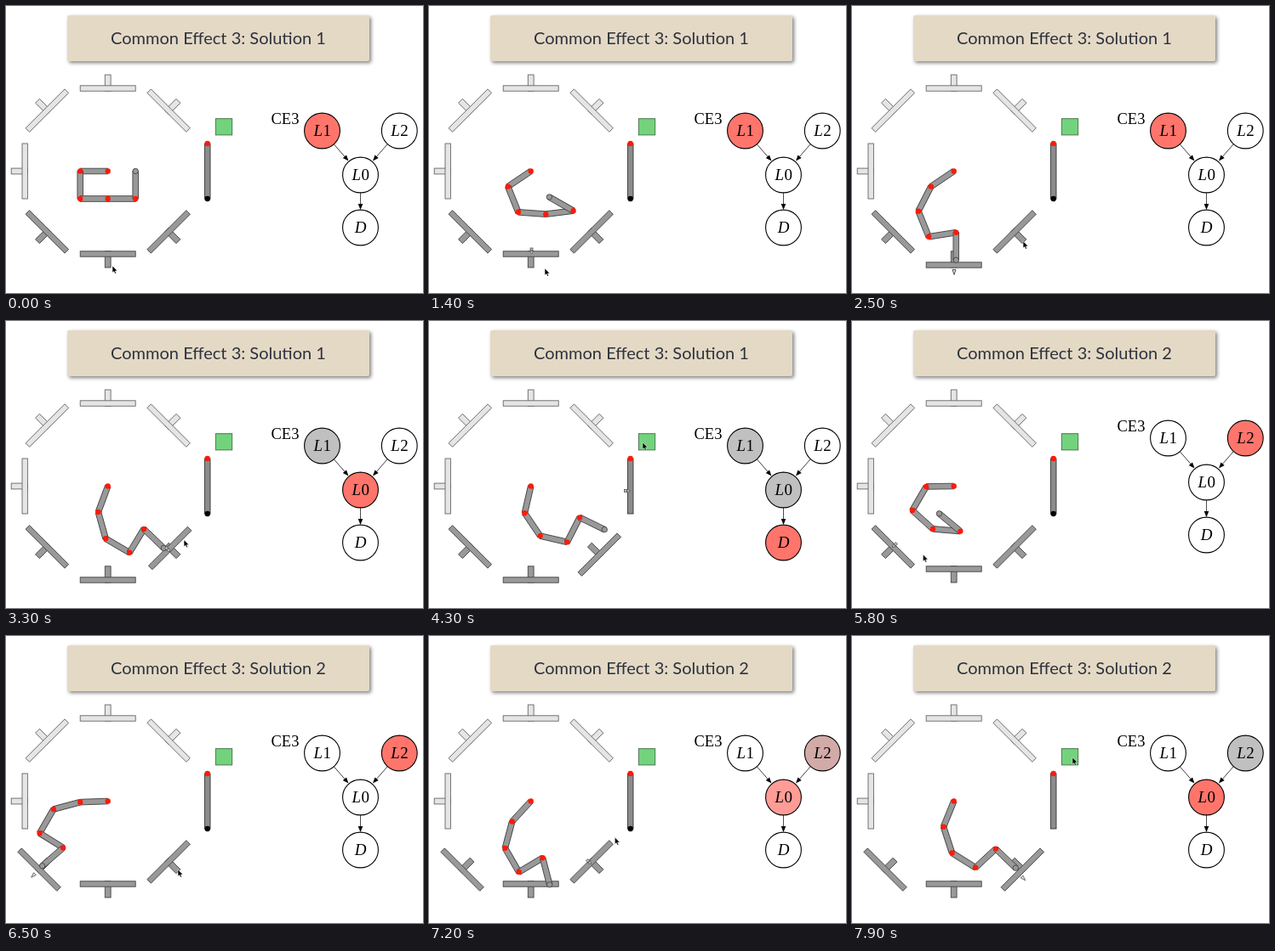
These frames come from a looping animation (490 px wide and 338 px high, 8000 ms). An HTML page with a canvas:

```html
<!DOCTYPE html>
<html lang="en">
<head>
<meta charset="utf-8">
<style>
html, body { margin: 0; width: 100%; height: 100%; overflow: hidden; background: #fff; }
canvas { display: block; }
</style>
</head>
<body>
<canvas width="490" height="338"></canvas>
<script>
const ctx = document.querySelector('canvas').getContext('2d');
const LOOP = 8000, RESET = 5000, LINK = 32.5, RED = '#ff1a0a', DEG = Math.PI / 180;

// Absolute link angles in degrees, from the base outwards
const pose = {
  rest: [180, 90, 0, 0, -90],
  swing: [146, 68, 4, -7, -150],
  touch1: [150, 112, 55, -30, -265],
  push1: [146, 117, 68, -9, -270],
  touch2: [178, 165, 105, 12, -215],
  push2: [178, 165, 120, 32, -221],
  touch0: [110, 75, 30, -62, -316],
  push0: [112, 72, 32, -43, -316],
  reach: [103, 56, 13, -63, -334],
  touchDoor: [64, 30, -6, -76, -368],
  pushDoor: [50, 25, -5, -60, -368]
};
const armKeys = [
  [0, 'rest'], [800, 'rest'], [1400, 'swing'], [2000, 'touch1'], [2400, 'push1'], [2650, 'push1'],
  [3250, 'touch0'], [3550, 'push0'], [3750, 'push0'], [4300, 'reach'], [4700, 'touchDoor'],
  [4999, 'pushDoor'], [RESET, 'rest'], [5500, 'rest'], [6250, 'touch2'], [6500, 'push2'],
  [6700, 'push2'], [7450, 'touch0'], [7800, 'push0'], [LOOP, 'push0']
].map(([t, name]) => [t, ...pose[name]]);
const cursorKeys = [
  [0, 125, 306], [900, 132, 320], [1400, 136, 309], [1800, 150, 306], [2450, 201, 277],
  [3200, 202, 277], [3900, 251, 143], [4999, 251, 143], [RESET, 39, 275], [5600, 40, 275],
  [6350, 202, 275], [7000, 202, 275], [7700, 259, 143], [LOOP, 259, 143]
];

const ramp = (t, a, b) => Math.min(1, Math.max(0, (t - a) / (b - a)));
const mix = (a, b, k) => a + (b - a) * k;

function sample(keys, t) {
  const i = keys.findIndex(k => k[0] > t), a = keys[i - 1], b = keys[i];
  return a.slice(1).map((v, j) => mix(v, b[j + 1], ramp(t, a[0], b[0])));
}

function box(x, y, w, h, fill, stroke) {
  ctx.fillStyle = fill;
  ctx.fillRect(x, y, w, h);
  ctx.strokeStyle = stroke;
  ctx.strokeRect(x, y, w, h);
}

function disc(x, y, r, fill, stroke) {
  ctx.beginPath();
  ctx.arc(x, y, r, 0, 7);
  ctx.fillStyle = fill;
  ctx.fill();
  if (stroke) {
    ctx.strokeStyle = stroke;
    ctx.stroke();
  }
}

function shape(points, fill, stroke) {
  ctx.beginPath();
  points.forEach(p => ctx.lineTo(...p));
  ctx.closePath();
  ctx.fillStyle = fill;
  ctx.fill();
  if (stroke) {
    ctx.strokeStyle = stroke;
    ctx.stroke();
  }
}

function at(x, y, deg, draw) {
  ctx.save();
  ctx.translate(x, y);
  ctx.rotate(deg * DEG);
  draw();
  ctx.restore();
}

function text(str, x, y, font, color = '#000') {
  ctx.font = font;
  ctx.fillStyle = color;
  ctx.fillText(str, x, y);
}

function title(n) {
  ctx.save();
  ctx.shadowColor = 'rgba(0,0,0,.5)';
  ctx.shadowBlur = 4;
  ctx.shadowOffsetX = ctx.shadowOffsetY = 2;
  ctx.fillStyle = '#e4d9c5';
  ctx.beginPath();
  ctx.roundRect(72, 11, 355, 54, 2);
  ctx.fill();
  ctx.restore();
  ctx.textAlign = 'center';
  text('Common Effect 3: Solution ' + n, 249.5, 45, '20px Lato, sans-serif', '#2d333d');
}

// Bar slides outwards along a fixed track
function lever(deg, push, active) {
  const r = deg % 90 ? 101 : 97.5, fill = active ? '#999' : '#e5e5e5', edge = active ? '#444' : '#666';
  at(119.7, 194.5, deg, () => {
    box(-3.4, r - 3.2, 6.8, 19.2, fill, edge);
    box(-32.5, r - 3.2 + 13 * push, 65, 6.4, fill, edge);
  });
}

function door(swing, locked) {
  at(236.7, 162, -22 * swing, () => {
    box(-3.3, 0, 6.6, 65, '#8c8c8c', '#333');
    if (locked) disc(0, 65, 3.2, '#000');
    disc(0, 0, 3.2, RED);
  });
}

function arm(angles) {
  const joints = [[119.7, 194.5]];
  angles.forEach((a, i) => {
    const [x, y] = joints[i];
    at(x, y, a, () => box(0, -3.3, LINK, 6.6, '#999', '#444'));
    joints.push([x + LINK * Math.cos(a * DEG), y + LINK * Math.sin(a * DEG)]);
  });
  joints.forEach(([x, y], i) => i < 5 ? disc(x, y, 3.2, RED) : disc(x, y, 3.2, '#999', '#444'));
}

// Small arrow showing where the arm is heading
function marker(deg, from, to, push) {
  at(mix(from[0], to[0], push), mix(from[1], to[1], push), deg, () => {
    if (push < .3) box(-1.5, -2, 3, 3, '#bbb', '#444');
    shape([[-2, 1.5], [2, 1.5], [0, 5 + 2.5 * push]], '#ddd', '#444');
  });
}

function arrow(x1, y1, x2, y2) {
  const len = Math.hypot(x2 - x1, y2 - y1);
  at(x1, y1, Math.atan2(y2 - y1, x2 - x1) / DEG, () => {
    ctx.strokeStyle = '#000';
    ctx.beginPath();
    ctx.moveTo(0, 0);
    ctx.lineTo(len - 5, 0);
    ctx.stroke();
    shape([[len, 0], [len - 7, -2.8], [len - 7, 2.8]], '#000');
  });
}

// Heat runs 0 white, 1 red, 2 grey
function heatColor(h) {
  const stops = [[255, 255, 255], [255, 117, 107], [192, 192, 192], [192, 192, 192]], i = Math.floor(h);
  return `rgb(${stops[i].map((v, j) => mix(v, stops[i + 1][j], h - i))})`;
}

function node(letter, digit, x, y, heat) {
  ctx.lineWidth = 1.1;
  disc(x, y, 20.9, heatColor(heat), '#000');
  ctx.textAlign = digit ? 'left' : 'center';
  text(letter, digit ? x - 10 : x, y + 6, 'italic 19px "Liberation Serif", serif');
  if (digit) text(digit, x + 1, y + 6, '19px "Liberation Serif", serif');
}

function graph(dy, l1, l2, l0, d) {
  ctx.save();
  ctx.translate(0, dy);
  ctx.textAlign = 'left';
  text('CE3', 311.5, 139, '18.5px "Liberation Serif", serif');
  arrow(385.5, 163, 402.5, 182.5);
  arrow(448, 163, 431, 182.5);
  arrow(416.5, 220, 416.5, 240);
  node('L', '1', 371.5, 147, l1);
  node('L', '2', 462.3, 147, l2);
  node('L', '0', 416.5, 199, l0);
  node('D', '', 416.5, 261, d);
  ctx.restore();
}

function cursor([x, y]) {
  ctx.lineWidth = .5;
  shape([[0, 0], [0, 8], [1.8, 6.5], [3.2, 9.2], [4.5, 8.6], [3.3, 6], [5.8, 5.8]]
    .map(([a, b]) => [x + a, y + b]), '#000', '#fff');
}

function draw(t) {
  const second = t >= RESET;
  const push1 = second ? 0 : ramp(t, 2000, 2400);
  const push2 = ramp(t, 6250, 6500);
  const push0 = second ? ramp(t, 7450, 7800) : ramp(t, 3250, 3550);

  ctx.fillStyle = '#fff';
  ctx.fillRect(0, 0, 490, 338);
  title(second ? 2 : 1);

  ctx.lineWidth = .9;
  if (t > 1000 && t < 2650 && push1 > .3) marker(0, [120.5, 287], [120, 309], push1);
  for (const a of [90, 135, 180, 225]) lever(a, 0, false);
  lever(0, push1, true);
  lever(45, push2, true);
  lever(-45, push0, true);
  box(246.3, 132.7, 19.4, 19.2, '#73d37d', '#3f6b44');
  door(second ? 0 : ramp(t, 4700, 4990), push0 < 1);
  arm(sample(armKeys, t));

  ctx.lineWidth = .7;
  if (t > 1000 && push1 <= .3 && !second) marker(0, [120.5, 287], [120, 309], push1);
  if (t > 5700 && t < 6700) marker(45, [51, 263], [35, 279], push2);
  if (t > 2750 && t < 3750 || t > 6800) marker(-45, [187, 265], [198.5, 282.5], push0);
  if (t > 3850 && !second) marker(-90, [231.5, 200], [246, 200], ramp(t, 4700, 4990));

  if (!second) {
    const a = ramp(t, 2900, 3200), b = ramp(t, 3750, 4050);
    graph(0, 1 + a, 0, a + b, b);
  } else if (t >= 5500) {
    const a = ramp(t, 6950, 7300);
    graph(-9, 0, 1 + a, a, 0);
  }
  cursor(sample(cursorKeys, t));
}

function tick() {
  draw(performance.now() % LOOP);
  requestAnimationFrame(tick);
}
tick();
</script>
</body>
</html>
```
